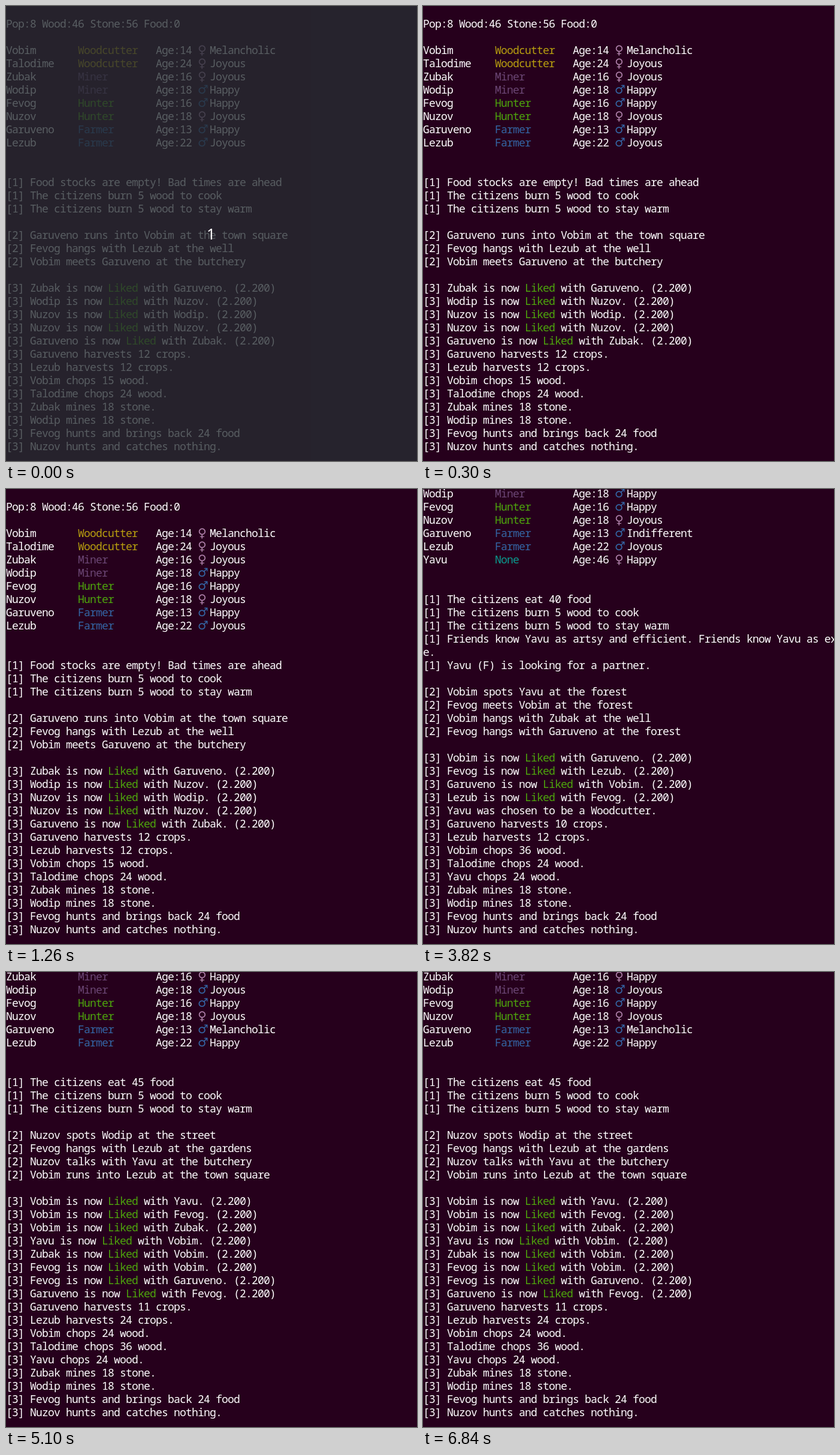
An HTML page that plays this animation: 686 by 758 pixels, repeating every 8000 ms.

```html
<!DOCTYPE html>
<html lang="en">
<head>
<meta charset="utf-8">
<title>Town simulation</title>
<style>
  html, body { margin: 0; width: 100%; height: 100%; overflow: hidden; background: #26001c; }
  #screen, #countdown { position: absolute; inset: 0; overflow: hidden; }
  #screen {
    color: #fff; font: 18px/22px "Noto Sans Mono", monospace; letter-spacing: -.8px;
    font-variant-ligatures: none;
  }
  #screen div { height: 22px; white-space: pre; }
  #screen div:first-child { margin-top: -4px; }
  .Woodcutter { color: #b9a00f; }
  .Miner { color: #6b4674; }
  .Hunter, .Liked { color: #4ea60c; }
  .Farmer, .male { color: #3465a4; }
  .None { color: #0b9a91; }
  .female { color: #ad7fa8; }
  .male, .female {
    display: inline-block; width: 20px; letter-spacing: 0;
    font: 20px/0 "DejaVu Sans", sans-serif;
  }
  #countdown {
    background: rgba(38, 45, 50, .77); color: #fff;
    font: 25px/1 "Noto Sans", sans-serif;
  }
  #countdown span { position: absolute; left: 335px; top: 367px; }
</style>
</head>
<body>
<div id="screen"></div>
<div id="countdown"><span>1</span></div>
<script>
const paint = (name, text = name) => `<span class="${name}">${text}</span>`;

const person = (name, job, age, sex, mood) =>
  name.padEnd(12) + paint(job) + " ".repeat(13 - job.length) + `Age:${age} ` +
  (sex === "F" ? paint("female", "♀") : paint("male", "♂")) + mood;

const liked = (a, b) => `${a} is now ${paint("Liked")} with ${b}. (2.200)`;

// Each phase of the day is a numbered block of messages.
const log = (...phases) => phases
  .map((lines, i) => lines.map(line => `[${i + 1}] ${line}`).join("\n"))
  .join("\n\n");

const burn = ["The citizens burn 5 wood to cook", "The citizens burn 5 wood to stay warm"];
const farm = (a, b) => [`Garuveno harvests ${a} crops.`, `Lezub harvests ${b} crops.`];
const chop = (a, b) => [`Vobim chops ${a} wood.`, `Talodime chops ${b} wood.`];
const mineAndHunt = [
  "Zubak mines 18 stone.", "Wodip mines 18 stone.",
  "Fevog hunts and brings back 24 food", "Nuzov hunts and catches nothing."
];

const page = (...parts) => parts.join("\n").split("\n").map(line => `<div>${line}</div>`).join("");

const pages = [
  page(
    "", "Pop:8 Wood:46 Stone:56 Food:0", "",
    person("Vobim", "Woodcutter", 14, "F", "Melancholic"),
    person("Talodime", "Woodcutter", 24, "F", "Joyous"),
    person("Zubak", "Miner", 16, "F", "Joyous"),
    person("Wodip", "Miner", 18, "M", "Happy"),
    person("Fevog", "Hunter", 16, "M", "Happy"),
    person("Nuzov", "Hunter", 18, "F", "Joyous"),
    person("Garuveno", "Farmer", 13, "M", "Happy"),
    person("Lezub", "Farmer", 22, "M", "Joyous"),
    "", "",
    log(
      ["Food stocks are empty! Bad times are ahead", ...burn],
      ["Garuveno runs into Vobim at the town square",
       "Fevog hangs with Lezub at the well",
       "Vobim meets Garuveno at the butchery"],
      [liked("Zubak", "Garuveno"), liked("Wodip", "Nuzov"), liked("Nuzov", "Wodip"),
       liked("Nuzov", "Nuzov"), liked("Garuveno", "Zubak"),
       ...farm(12, 12), ...chop(15, 24), ...mineAndHunt]
    )
  ),
  page(
    person("Wodip", "Miner", 18, "M", "Happy"),
    person("Fevog", "Hunter", 16, "M", "Happy"),
    person("Nuzov", "Hunter", 18, "F", "Joyous"),
    person("Garuveno", "Farmer", 13, "M", "Indifferent"),
    person("Lezub", "Farmer", 22, "M", "Joyous"),
    person("Yavu", "None", 46, "F", "Happy"),
    "", "",
    log(
      ["The citizens eat 40 food", ...burn,
       "Friends know Yavu as artsy and efficient. Friends know Yavu as ex\ne.",
       "Yavu (F) is looking for a partner."],
      ["Vobim spots Yavu at the forest",
       "Fevog meets Vobim at the forest",
       "Vobim hangs with Zubak at the well",
       "Fevog hangs with Garuveno at the forest"],
      [liked("Vobim", "Garuveno"), liked("Fevog", "Lezub"),
       liked("Garuveno", "Vobim"), liked("Lezub", "Fevog"),
       "Yavu was chosen to be a Woodcutter.",
       ...farm(10, 12), ...chop(36, 24), "Yavu chops 24 wood.", ...mineAndHunt]
    )
  ),
  page(
    person("Zubak", "Miner", 16, "F", "Happy"),
    person("Wodip", "Miner", 18, "M", "Joyous"),
    person("Fevog", "Hunter", 16, "M", "Happy"),
    person("Nuzov", "Hunter", 18, "F", "Joyous"),
    person("Garuveno", "Farmer", 13, "M", "Melancholic"),
    person("Lezub", "Farmer", 22, "M", "Happy"),
    "", "",
    log(
      ["The citizens eat 45 food", ...burn],
      ["Nuzov spots Wodip at the street",
       "Fevog hangs with Lezub at the gardens",
       "Nuzov talks with Yavu at the butchery",
       "Vobim runs into Lezub at the town square"],
      [liked("Vobim", "Yavu"), liked("Vobim", "Fevog"), liked("Vobim", "Zubak"),
       liked("Yavu", "Vobim"), liked("Zubak", "Vobim"), liked("Fevog", "Vobim"),
       liked("Fevog", "Garuveno"), liked("Garuveno", "Fevog"),
       ...farm(11, 24), ...chop(24, 36), "Yavu chops 24 wood.", ...mineAndHunt]
    )
  )
];

const screenEl = document.getElementById("screen");
const countdown = document.getElementById("countdown");
const start = performance.now();
let shown = -1;

function render() {
  const t = (performance.now() - start) % 8000;
  const index = t < 1900 ? 0 : t < 5100 ? 1 : 2;
  if (index !== shown) screenEl.innerHTML = pages[shown = index];
  countdown.hidden = t >= 300;
  requestAnimationFrame(render);
}
render();
</script>
</body>
</html>
```
